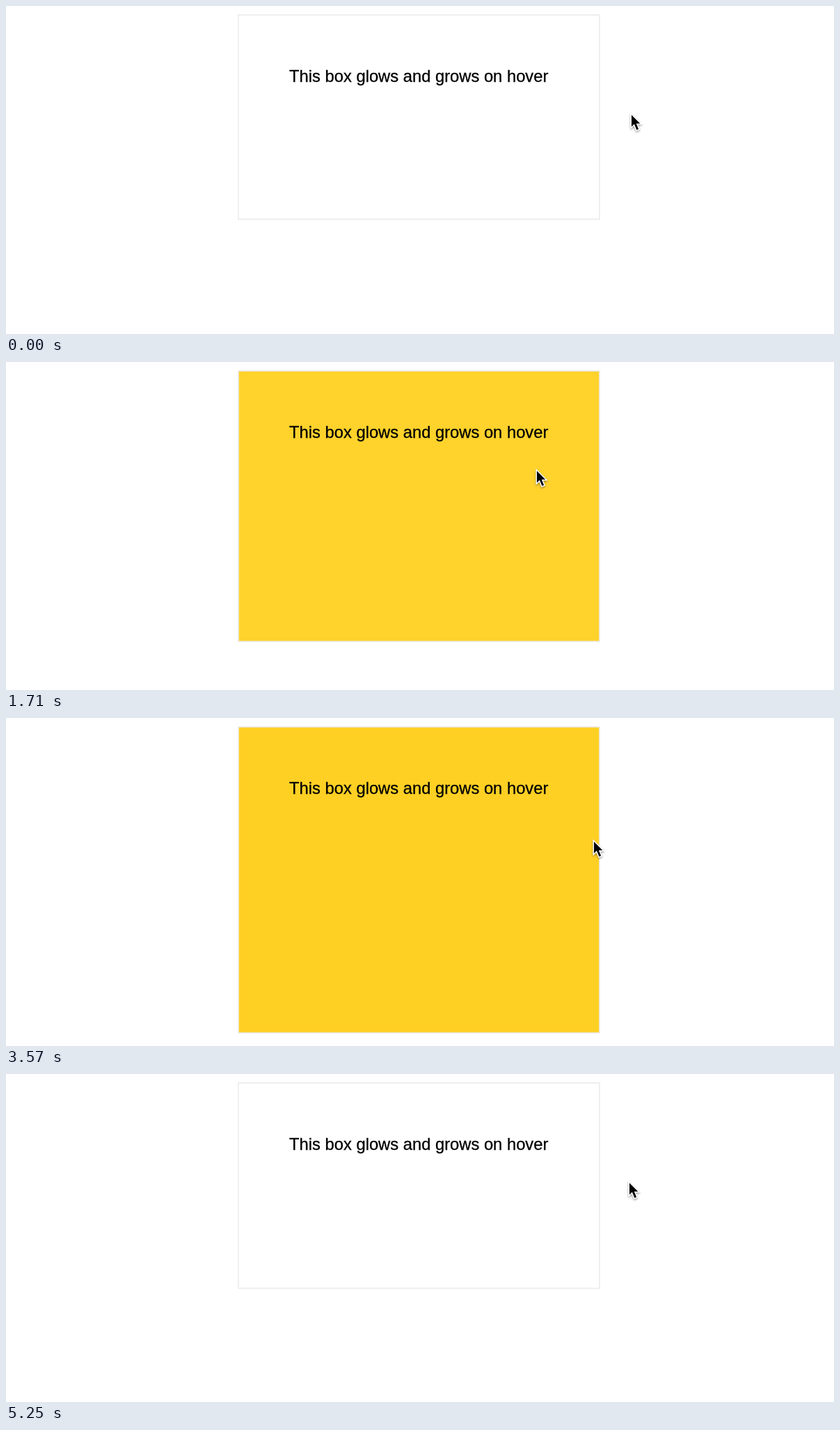
An HTML page with a canvas for the animation above (5.28 s loop, 1190 by 471 pixels).

```html
<!DOCTYPE html>
<html lang="en">
<head>
<meta charset="utf-8">
<title>Glow and grow box</title>
<style>
  html, body { margin: 0; width: 100%; height: 100%; overflow: hidden; background: #fff; }
  canvas { display: block; }
</style>
</head>
<body>
<canvas id="stage" width="1190" height="471"></canvas>
<script>
const ctx = document.getElementById('stage').getContext('2d');
const LOOP = 5280, STEP = 30;
const ENTER = 1028, LEAVE = 3688;
const GROW_MS = 1800, GLOW_MS = 900;
const BOX = { left: 333.2, top: 12, right: 853.8, bottom: 307, grow: 146, line: 1.6 };
const GLOW = [255, 208, 36];

// Pointer sweeps: quadratic curves from one rest point to the next
const OUTSIDE = { x: 899, y: 156.5 };
const INSIDE = { x: 763, y: 156.5 };
const SWEEP_IN = { start: 750, end: 1500, from: OUTSIDE, bend: { x: 779, y: 215 }, to: INSIDE };
const SWEEP_OUT = { start: 3030, end: 4050, from: INSIDE, bend: { x: 849, y: 199 }, to: { x: 896, y: 156.5 } };

const clamp = v => Math.min(1, Math.max(0, v));
const smooth = v => v * v * (3 - 2 * v);

// cubic-bezier(.25, .1, .25, 1)
function ease(x) {
  if (x <= 0 || x >= 1) return clamp(x);
  const bezier = (s, a, b) => 3 * (1 - s) ** 2 * s * a + 3 * (1 - s) * s * s * b + s ** 3;
  let lo = 0, hi = 1;
  for (let i = 0; i < 24; i++) {
    const mid = (lo + hi) / 2;
    if (bezier(mid, 0.25, 0.25) < x) lo = mid; else hi = mid;
  }
  return bezier(lo, 0.1, 1);
}

function hoverAmount(t, duration) {
  return t < LEAVE ? ease((t - ENTER) / duration) : 1 - ease((t - LEAVE) / duration);
}

function pointerAt(t) {
  const { start, end, from, bend, to } = t < SWEEP_OUT.start ? SWEEP_IN : SWEEP_OUT;
  const u = smooth(clamp((t - start) / (end - start)));
  const along = axis => (1 - u) ** 2 * from[axis] + 2 * u * (1 - u) * bend[axis] + u * u * to[axis];
  return [along('x'), along('y')];
}

function drawBox(t) {
  const { left, top, right, line } = BOX;
  const bottom = BOX.bottom + BOX.grow * hoverAmount(t, GROW_MS);
  const glow = hoverAmount(t, GLOW_MS);
  const color = GLOW.map(c => Math.round(255 + (c - 255) * glow));
  ctx.fillStyle = '#ebebeb';
  ctx.fillRect(left, top, right - left, bottom - top);
  ctx.fillStyle = `rgb(${color})`;
  ctx.fillRect(left + line, top + line, right - left - 2 * line, bottom - top - 2 * line);
}

function drawText() {
  const label = 'This box glows and grows on hover';
  ctx.font = '23.75px Helvetica, "Liberation Sans", Arial, sans-serif';
  ctx.textAlign = 'center';
  ctx.fillStyle = ctx.strokeStyle = '#000';
  ctx.lineWidth = 0.3;
  ctx.fillText(label, 593.2, 108.5);
  ctx.strokeText(label, 593.2, 108.5);
}

function drawPointer(t) {
  const arrow = new Path2D('M0 0V16.8L3.9 13L7.4 21.4L10.1 20.2L6.8 12.3H12.3Z');
  ctx.save();
  ctx.translate(...pointerAt(t));
  ctx.save();
  ctx.shadowColor = 'rgba(0, 0, 0, 0.4)';
  ctx.shadowBlur = 3;
  ctx.shadowOffsetY = 1.5;
  ctx.strokeStyle = '#fff';
  ctx.lineWidth = 3;
  ctx.stroke(arrow);
  ctx.restore();
  ctx.fillStyle = '#000';
  ctx.fill(arrow);
  ctx.restore();
}

const start = performance.now();
function render() {
  const elapsed = (performance.now() - start) % LOOP;
  const t = Math.floor(elapsed / STEP) * STEP;
  ctx.fillStyle = '#fff';
  ctx.fillRect(0, 0, 1190, 471);
  drawBox(t);
  drawText();
  drawPointer(t);
  requestAnimationFrame(render);
}
render();
</script>
</body>
</html>
```
